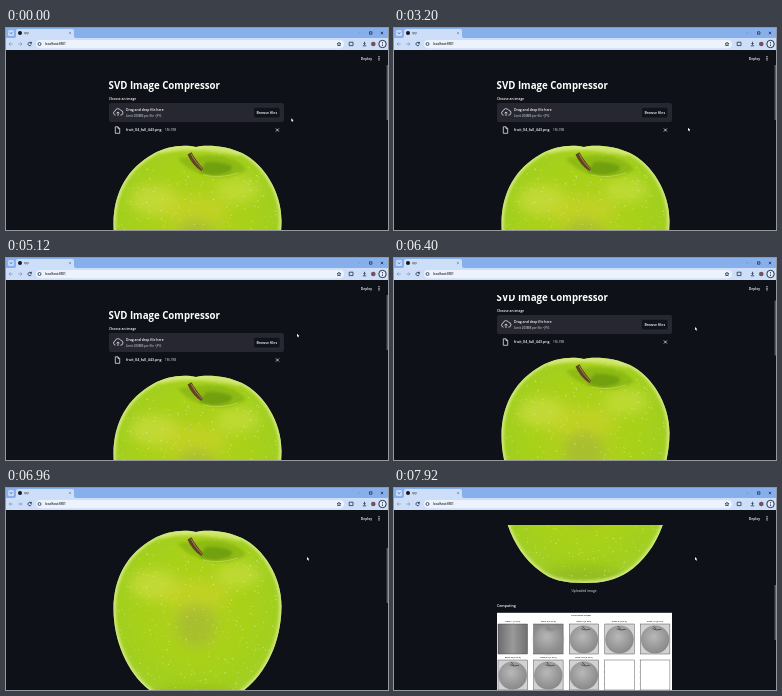
Animation, 382 px wide and 202 px high, one loop 8 s. Source, as an HTML page:

```html
<!DOCTYPE html>
<html lang="en">
<head>
<meta charset="utf-8">
<title>SVD Image Compressor</title>
<style>
  html, body { margin: 0; height: 100%; overflow: hidden; background: #0e1117; }
  svg { display: block; width: 100%; height: 100%; }
  text { font-family: "Open Sans", "Noto Sans", sans-serif; font-weight: 600; fill: #fff; }
  .dim { fill: #b4b7be; }
  .line { fill: none; stroke: #e4e5e8; stroke-width: .8; }
  .chrome { fill: none; stroke: #22304a; stroke-width: .8; }
  .faint { fill: none; stroke: #7d93b8; stroke-width: .7; }
  .ink { fill: #1c1c1c; }
</style>
</head>
<body>
<svg viewBox="0 0 382 202">
  <defs>
    <clipPath id="view"><rect y="37" width="382" height="165"/></clipPath>
    <path id="skin" d="M190 119C200 116 222 118 236 125C258 136 276 164 275.5 194C275 232 258 264 234 280C222 288 208 291 191 291C170 291 157 288 146 279C122 262 107.5 228 107.5 196C107.5 164 122 140 147 126C160 118 178 116 190 119Z"/>
    <clipPath id="inside"><use href="#skin"/></clipPath>
    <radialGradient id="green" cx=".49" cy=".45" r=".58">
      <stop offset="0" stop-color="#b4d022"/>
      <stop offset=".5" stop-color="#a9d118"/>
      <stop offset=".8" stop-color="#a2cf1e"/>
      <stop offset="1" stop-color="#a6d136"/>
    </radialGradient>
    <linearGradient id="bands">
      <stop offset="0" stop-color="#6c6c6c"/>
      <stop offset=".5" stop-color="#9a9a9a"/>
      <stop offset="1" stop-color="#707070"/>
    </linearGradient>
    <radialGradient id="gray" cx=".45" cy=".4" r=".65">
      <stop offset="0" stop-color="#b8b8b8"/>
      <stop offset="1" stop-color="#858585"/>
    </radialGradient>
    <filter id="soft" x="-50%" y="-50%" width="200%" height="200%"><feGaussianBlur stdDeviation="6"/></filter>
    <filter id="softer" x="-50%" y="-50%" width="200%" height="200%"><feGaussianBlur stdDeviation="1.8"/></filter>
  </defs>

  <rect width="382" height="202" fill="#0e1117"/>

  <g clip-path="url(#view)">
    <g id="page">
      <text x="102.6" y="60.6" font-size="9.7" style="font-weight:700">SVD Image Compressor</text>
      <text x="103" y="71.6" font-size="3.3">Choose an image</text>

      <rect x="103" y="75" width="175" height="19" rx="2" fill="#262730"/>
      <path class="line" d="M109.5 87.2a2.2 2.2 0 0 1-.3-4.3a2.9 2.9 0 0 1 5.5-.5a2.4 2.4 0 0 1-.3 4.8M112 88v-4m-1.5 1.4l1.5-1.5l1.5 1.5"/>
      <text x="120" y="83.2" font-size="3.4">Drag and drop file here</text>
      <text class="dim" x="120" y="89" font-size="2.9">Limit 200MB per file • JPG</text>
      <rect x="247.5" y="79.3" width="26.5" height="10.6" rx="2" fill="#10131b" stroke="#3a3c47" stroke-width=".4"/>
      <text x="260.8" y="85.9" font-size="3.6" text-anchor="middle">Browse files</text>

      <path class="line" d="M109.3 98.8h2.7l1.7 1.7v4.8h-4.4zM112 98.8v1.8h1.7"/>
      <text x="120" y="103.2" font-size="3.6">fruit_04_full_443.png</text>
      <text class="dim" x="159" y="103.2" font-size="2.9">156.7KB</text>
      <path class="line" d="M269.9 100.5l3 3m0-3l-3 3"/>

      <use href="#skin" fill="url(#green)"/>
      <g clip-path="url(#inside)">
        <g filter="url(#soft)">
          <ellipse cx="148" cy="172" rx="24" ry="15" fill="#d2e04a" opacity=".6"/>
          <ellipse cx="232" cy="162" rx="22" ry="12" fill="#d0e24a" opacity=".55"/>
          <ellipse cx="188" cy="182" rx="34" ry="14" fill="#cad426" opacity=".6"/>
          <ellipse cx="190" cy="212" rx="20" ry="22" fill="#a4b43a" opacity=".6"/>
          <ellipse cx="190" cy="284" rx="44" ry="9" fill="#82aa18" opacity=".5"/>
        </g>
        <g id="specks" fill="#e6f0a0"/>
        <g filter="url(#softer)">
          <path d="M172 130Q178 141 200 147T240 142Q232 128 204 127Z" fill="#86b40c" opacity=".75"/>
          <path d="M193 144Q204 149 216 146T226 138Q214 133 200 134Z" fill="#5f8c08" opacity=".6"/>
          <path d="M154 124Q186 116 234 126" fill="none" stroke="#cfe463" stroke-width="4"/>
          <use href="#skin" fill="none" stroke="#d6ea86" stroke-width="4"/>
        </g>
        <path d="M197 147Q214 151 232 145" fill="none" stroke="#cfe070" stroke-width=".8" opacity=".7"/>
      </g>
      <path d="M181.5 126.5L185.5 124.2Q189 131 197 140.5L195.3 143Q186 137 181.5 126.5Z" fill="#604322"/>
      <path d="M185 126Q189 134 196 141" fill="none" stroke="#b58c55" stroke-width=".9"/>

      <text class="dim" x="190" y="300.3" font-size="3.2" text-anchor="middle">Uploaded image</text>
      <text x="103" y="315.3" font-size="3.5">Computing</text>
      <rect x="103" y="320.8" width="175" height="90" fill="#fff"/>
      <text class="ink" x="187" y="323.8" font-size="2.1" text-anchor="middle">Compressed Images</text>
      <g id="plots"/>
    </g>
  </g>

  <text x="354.8" y="31.8" font-size="3.4">Deploy</text>
  <g fill="#fff"><circle cx="373" cy="28.7" r=".6"/><circle cx="373" cy="30.3" r=".6"/><circle cx="373" cy="31.9" r=".6"/></g>
  <rect id="thumb" x="380.6" y="37" width="1.4" height="55" fill="#5b5e66"/>

  <rect width="382" height="11" fill="#86afec"/>
  <rect y="10" width="382" height="12" fill="#cddef9"/>
  <path d="M8 10.2Q10 10 10 8V3Q10 1 12 1H66Q68 1 68 3V8Q68 10 70 10.2Z" fill="#cddef9"/>
  <rect x="2" y="2" width="6" height="6" rx="1.5" fill="#c5dafb"/>
  <path class="chrome" d="M4 4.5l1.1 1.1l1.1-1.1M363.5 3.8h2.4v2.4h-2.4zM374.8 3.8l2.4 2.4m0-2.4l-2.4 2.4"/>
  <path class="faint" d="M62.9 3.9l2.2 2.2m0-2.2l-2.2 2.2M352 5h2.6M6.8 16H3m1.6-1.6L3 16l1.6 1.6M12.2 16H16m-1.6-1.6L16 16l-1.6 1.6"/>
  <circle cx="14" cy="5" r="2" fill="#14181f"/>
  <text class="ink" x="18" y="6" font-size="2.8" opacity=".7">app</text>
  <rect x="30" y="12" width="308" height="8.2" rx="4.1" fill="#edf3fd"/>
  <path class="chrome" d="M25.2 15.2a1.7 1.7 0 1 0 .1 1.3M25.4 13.8v1.5h-1.5M333 14.2l.6 1.2l1.3.2l-1 .9l.3 1.3l-1.2-.6l-1.2.6l.3-1.3l-1-.9l1.3-.2zM343.2 14.2h3.8v3.4h-3.8zM358.5 13.8v2.7m-1.1-1.1l1.1 1.1l1.1-1.1M356.8 17.8h3.4"/>
  <circle cx="33.5" cy="16" r="1.5" class="chrome"/>
  <text class="ink" x="39" y="17.1" font-size="3">localhost:8501</text>
  <circle cx="367.3" cy="16" r="2.3" fill="#775059"/>
  <circle cx="376.5" cy="16" r="3.7" fill="#e6effd" stroke="#22304a"/>
  <g fill="#22304a"><circle cx="376.5" cy="14.5" r=".6"/><circle cx="376.5" cy="16" r=".6"/><circle cx="376.5" cy="17.5" r=".6"/></g>

  <path id="cursor" d="M0 0V3.2L.8 2.5L1.4 3.7L1.9 3.4L1.4 2.3H2.3Z" fill="#fff"/>
</svg>
<script>
const el = id => document.getElementById(id);

let seed = 7;
const random = () => (seed = seed * 16807 % 2147483647) / 2147483647;

let specks = "";
for (let i = 0; i < 600; i++) {
  const x = 107 + random() * 169, y = 122 + random() * 168;
  specks += `<circle cx="${x}" cy="${y}" r="${.3 + random() * .5}" opacity="${.2 + random() * .4}"/>`;
}
el("specks").innerHTML = specks;

// Ten small charts: eight reconstructions, then two empty axes
function plot(i) {
  const x = 104 + i % 5 * 35.6, y = i < 5 ? 332 : 368;
  const frame = `<rect x="${x}" y="${y}" width="29.5" height="30" stroke="#333" stroke-width=".4" `;
  if (i > 7) {
    let ticks = "";
    for (let k = 0; k < 6; k++) ticks += `M${x - .9} ${y + k * 6}h.9`;
    return frame + `fill="#fff"/><path d="${ticks}" stroke="#333" stroke-width=".3"/>`;
  }
  const title = `<text class="ink" x="${x + 14.7}" y="${y - 1.8}" font-size="2.2" text-anchor="middle">Rank ${2 ** i} (${i + 1} of 8)</text>`;
  if (!i) return title + frame + `fill="url(#bands)"/>`;
  const blur = i === 1 ? ` filter="url(#softer)"` : "";
  return title + frame + `fill="${i === 1 ? "#8b8b8b" : "#d2d2d2"}"/>
    <g${blur}><ellipse cx="${x + 14.7}" cy="${y + 15.5}" rx="14.2" ry="14" fill="url(#gray)"/>
    <path d="M${x + 12} ${y + 4.8}q4 2 9 .5M${x + 13} ${y + 2}l3 3.4" fill="none" stroke="#444" stroke-width=".8"/></g>`;
}
el("plots").innerHTML = Array.from({ length: 10 }, (_, i) => plot(i)).join("");

// Rows are [time, values...]; each holds until the next
const pointer = [
  [0, 285.3, 90.3], [2720, 287, 92], [2800, 289.5, 94], [2880, 291, 96], [3120, 293, 98.5],
  [3200, 294, 99.7], [3760, 305, 88], [4240, 306, 84], [4320, 306, 81], [4560, 290, 77],
  [4720, 290, 76], [4800, 291, 75.7], [5360, 299.7, 72], [5520, 300.7, 70], [5840, 301, 69]
];
const scroll = [
  [0, 0], [6320, 5], [6400, 18], [6480, 24], [6560, 25],
  [6720, 32], [6800, 53], [6880, 70], [6960, 75],
  [7200, 84], [7280, 113], [7360, 142], [7440, 168], [7520, 185], [7600, 193], [7760, 196]
];
const at = (rows, t) => rows.findLast(row => row[0] <= t);

function draw() {
  const t = performance.now() % 8000;
  const [, x, y] = at(pointer, t), [, top] = at(scroll, t);
  el("page").setAttribute("transform", `translate(0 ${-top})`);
  el("thumb").setAttribute("y", 37 + top * .306);
  el("cursor").setAttribute("transform", `translate(${x} ${y})`);
  requestAnimationFrame(draw);
}
draw();
</script>
</body>
</html>
```
